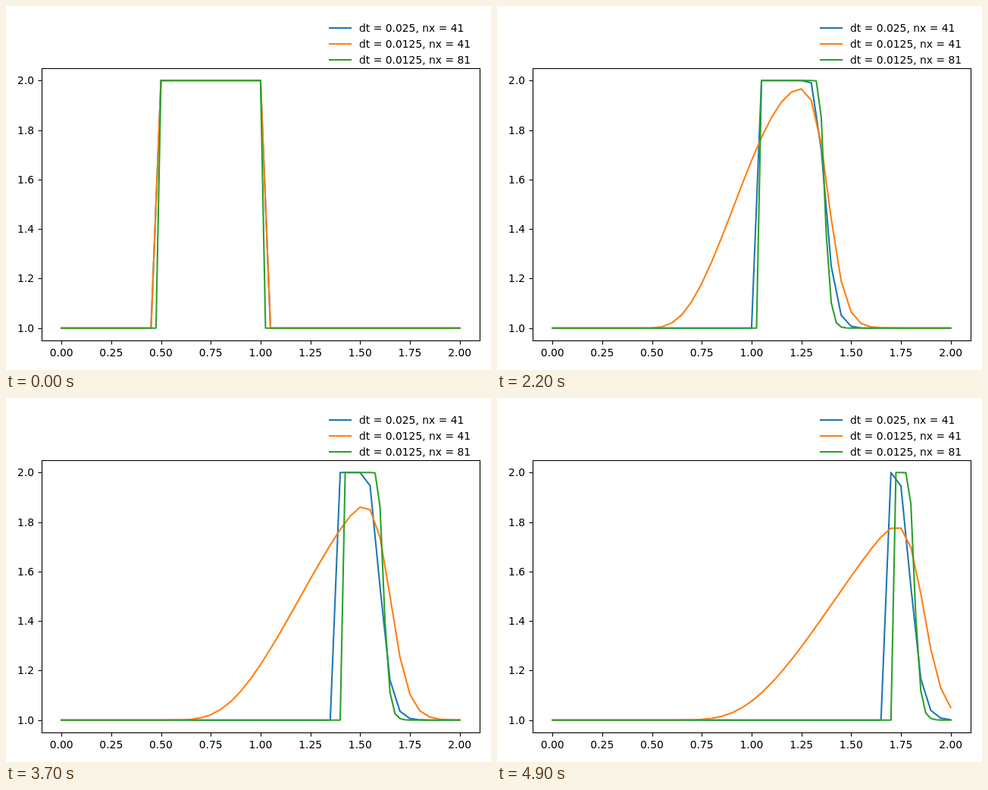
Write an HTML page that moves like this. It is 640 by 480 pixels and loops after 5 s.

```html
<!DOCTYPE html>
<html lang="en">
<head>
<meta charset="utf-8">
<title>Nonlinear convection</title>
<style>
  html, body { margin: 0; width: 100%; height: 100%; overflow: hidden; background: #fff; }
  svg { display: block; width: 640px; height: 480px; }
  text { font: 13.889px "DejaVu Sans", sans-serif; }
  .axis { fill: none; stroke: #000; stroke-width: 1.111; }
  .line { fill: none; stroke-width: 2.083; stroke-linecap: square; stroke-linejoin: round; }
</style>
</head>
<body>
<svg id="plot" viewBox="0 0 640 480"></svg>
<script>
const STEP_MS = 100, STEPS = 50, DT = 0.0125;
const plot = document.getElementById("plot");
const px = x => 73.1 + 262.8 * x;
const py = u => 424.7 - 326.4 * (u - 1);

function add(tag, attrs, text = "") {
  const el = document.createElementNS("http://www.w3.org/2000/svg", tag);
  for (const key in attrs) el.setAttribute(key, attrs[key]);
  el.textContent = text;
  return plot.appendChild(el);
}

// Square pulse carried by u_t + u u_x = 0, upwind differences on [0, 2]
function solve(dt, nx, steps) {
  const dx = 2 / (nx - 1);
  let u = Array.from({ length: nx }, (_, i) => {
    const x = i * dx;
    return x > 0.499 && x < 1.001 ? 2 : 1;
  });
  for (let n = 0; n < steps; n++)
    u = u.map((v, i) => i ? v - v * dt / dx * (v - u[i - 1]) : 1);
  return u.map((v, i) => px(i * dx).toFixed(2) + "," + py(v).toFixed(2)).join(" ");
}

const series = [
  { dt: 0.025, nx: 41, color: "#1f77b4" },
  { dt: 0.0125, nx: 41, color: "#ff7f0e" },
  { dt: 0.0125, nx: 81, color: "#2ca02c" }
];

for (let i = 0; i <= 8; i++) {
  const x = px(i / 4);
  add("path", { class: "axis", d: `M${Math.round(x) + 0.5} 441.5v5` });
  add("text", { x, y: 462, "text-anchor": "middle" }, (i / 4).toFixed(2));
}
for (let i = 0; i <= 5; i++) {
  const u = 1 + i / 5, y = py(u);
  add("path", { class: "axis", d: `M47.5 ${Math.round(y) + 0.5}h-5` });
  add("text", { x: 37.2, y: Math.round(y + 5), "text-anchor": "end" }, u.toFixed(1));
}
series.forEach((s, i) => {
  const y = 29 + 21 * i;
  s.curve = add("polyline", { class: "line", stroke: s.color });
  add("path", { class: "line", stroke: s.color, d: `M427 ${y}H455` });
  add("text", { x: 466, y: y + 5 }, `dt = ${s.dt}, nx = ${s.nx}`);
});
add("rect", { class: "axis", x: 47.5, y: 82.5, width: 578, height: 359 });

const start = performance.now();
let shown = -1;
function draw() {
  const step = Math.floor((performance.now() - start) / STEP_MS) % STEPS;
  if (step !== shown) {
    shown = step;
    for (const { dt, nx, curve } of series)
      curve.setAttribute("points", solve(dt, nx, Math.floor(step * DT / dt)));
  }
  requestAnimationFrame(draw);
}
draw();
</script>
</body>
</html>
```
